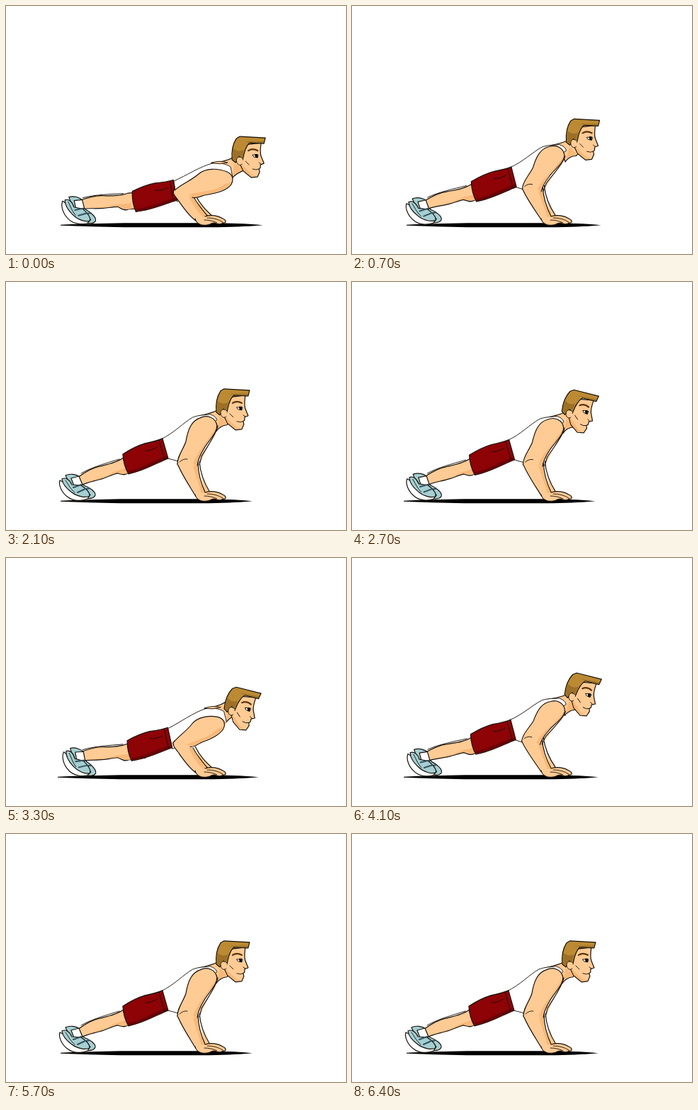
These frames come from a looping animation (480 by 350 pixels, 6500 ms). An HTML page without scripts:

```html
<!DOCTYPE html>
<html lang="en">
<head>
<meta charset="utf-8">
<title>Push-ups</title>
<style>
/* t: tick of 100 ms, j: pose 0-17 of one push-up, d: drop from the top,
   e: drop from the drawn high pose, f: drop from the drawn bent pose,
   r: 1 while pushing up, low: arms bent */
@property --t { syntax: "<integer>"; inherits: true; initial-value: 0; }
@property --j { syntax: "<number>"; inherits: true; initial-value: 0; }
@property --d { syntax: "<number>"; inherits: true; initial-value: 40; }
@property --e { syntax: "<number>"; inherits: true; initial-value: 33; }
@property --f { syntax: "<number>"; inherits: true; initial-value: 0; }
@property --r { syntax: "<number>"; inherits: true; initial-value: 0; }
@property --low { syntax: "<number>"; inherits: true; initial-value: 1; }

@keyframes tick { from { --t: 0; } to { --t: 65; } }

html, body { margin: 0; width: 100%; height: 100%; overflow: hidden; background: #fff; }
svg {
  display: block; width: 480px; height: 350px;
  animation: tick 6500ms steps(65) -4ms infinite;
  --j: round(down, mod(var(--t) * 2.5, 18), 1);
  --d: max(min(66 - .72 * pow(var(--j) - 6, 2), 140 - 10 * var(--j)), 1.7 * pow(max(0, var(--j) - 14), 2));
  --e: calc(var(--d) - 7);
  --f: calc(var(--e) - 33);
  --r: max(0, min((var(--j) - 4) / 4, (16 - var(--j)) / 3, 1));
  --low: clamp(0, (var(--e) - 26) * 9, 1);
}

path { stroke: #17100a; stroke-width: 1.2; stroke-linejoin: round; stroke-linecap: round; fill: none; }
.skin { fill: #ffcb94; }
.shade { fill: #f8b878; stroke: none; }
.white { fill: #fff; }
.hair { fill: #bb8a33; }
.dark { fill: #9c7027; stroke: none; }
.red { fill: #8d0306; }
.deep { fill: #6a0004; stroke: none; }
.teal { fill: #a5cfd2; }
.strap { stroke: #35525f; stroke-width: 2; }
.thin { stroke-width: .9; }
.black { fill: #000; stroke: none; }

.shadow {
  transform: translate(calc(77px - 4px * var(--r)), 309.3px)
    scaleX(calc((271 + .45 * var(--e) - 2 * var(--r)) / 271));
}
.shoes {
  transform-origin: 110px 305px;
  transform: rotate(calc((.25 * var(--e) + 3 * var(--r)) * 1deg));
}
.leg {
  transform-origin: 104px 280px;
  transform: rotate(calc((.43 - .05 * var(--r)) * var(--e) * 1deg));
}
.shorts {
  transform-origin: 168px 256px;
  transform: translate(calc((.36 - .2 * var(--r)) * var(--e) * 1px), calc((.57 - .12 * var(--r)) * var(--e) * 1px))
    rotate(calc((.18 - .07 * var(--r)) * var(--e) * 1deg));
}
.head {
  transform-origin: 320px 180px;
  transform: translate(calc(((.67 - .28 * var(--r)) * var(--e) - 1.5 * var(--r)) * 1px), calc(var(--e) * 1px))
    rotate(calc(11deg * var(--r)));
}
.high { opacity: calc(1 - var(--low)); }
.bent { opacity: var(--low); }
.high.torso {
  transform-origin: 227px 235px;
  transform: translate(calc((.39 - .23 * var(--r)) * var(--e) * 1px), calc((.77 - .2 * var(--r)) * var(--e) * 1px))
    rotate(calc(.25deg * var(--e)));
}
.bent.torso {
  transform-origin: 240px 260px;
  transform: translate(calc((.39 * var(--f) - .23 * var(--r) * var(--e)) * 1px), calc((.77 * var(--f) - .2 * var(--r) * var(--e)) * 1px))
    rotate(calc((.3 * var(--f) - 3 * var(--r)) * 1deg));
}
.fore { transform-origin: 274px 302px; }
.high .fore { transform: rotate(calc(-.25deg * var(--e))); }
.bent .fore { transform: rotate(calc(-.1deg * var(--f))); }
.high .upper {
  transform-origin: 250px 256px;
  transform: translate(calc(-.2px * var(--e)), calc(.1px * var(--e)))
    rotate(calc(.8deg * var(--e))) scale(calc(1 - .005 * var(--e)));
}
.bent .upper {
  transform-origin: 246px 262px;
  transform: translateX(calc(-.1px * var(--f) - 3px * var(--r)))
    rotate(calc((.7 * var(--f) - 11 * var(--r)) * 1deg)) scale(calc(1 - .06 * var(--r)));
}
</style>
</head>
<body>
<svg viewBox="0 0 480 350">
  <path class="shadow black" d="M0,-.6 Q40,-2.4 85,-3 H210 Q250,-2.4 271,0 Q250,2.2 210,3 H85 Q40,2 0,.4Z"/>

  <g class="high torso">
    <path class="skin" d="M270,190 C282,187 292,185 299,181 L306,176 L318,195 L312,202 C306,202 300,206 297,211 L290,192Z"/>
    <path class="shade" d="M302,190 L314,200 C306,201 301,204 298,208Z"/>
    <path class="white thin" d="M219,222 C238,213 250,199 264,191 C272,188 280,188 288,187 Q296,189 298,195 L285,205 L262,240 L243,253 L228,249Z"/>
  </g>
  <g class="bent torso">
    <path class="skin" d="M290,221 C302,220 312,219 320,214 L330,214 L338,231 C330,234 324,237 320,242 L312,226Z"/>
    <path class="shade" d="M322,222 L336,231 C328,234 323,237 320,241Z"/>
    <path class="white thin" d="M237,247 C255,239 275,226 291,222 C300,221 310,222 317,227 L320,242 L300,262 L262,268 L242,276Z"/>
    <path class="shade" d="M319,240 C319,256 300,264 284,267 L295,250Z"/>
    <path class="skin thin" d="M290,221.500 Q301,217 313,221 Q301,224 290,221.500"/>
  </g>

  <g class="shoes">
    <path class="teal" d="M84,273 C90,270 99,271 104,275 L110,287 C118,290 127,296 126,301 C124,306 116,306 110,305 L90,285Z"/>
    <path class="strap" d="M111,293 L118,291"/>
  </g>
  <g class="leg">
    <path class="skin" d="M101,276 C112,268 122,262 133,260 C145,257 156,255 166,248 L190,240 L195,262 L172,270 C167,274 162,271 157,270 C150,272 144,275 138,277 C126,281 116,282 108,286Z"/>
    <path class="shade" d="M109,284 C125,278 140,276 149,270 C158,265 168,264 174,260 L177,268 C168,272 164,270 157,269 C150,271 146,273 138,276 C126,280 116,281 109,284Z"/>
    <path class="thin" d="M106,270 C122,261 141,256 160,250"/>
  </g>
  <g class="shoes">
    <path class="white" d="M92,277 L103,274 L108,286 L97,290Z"/>
    <path class="white" d="M76,280 C74,287 79,298 88,304 C96,310 108,309 115,306 L119,300Z"/>
    <path class="teal" d="M79,278 C84,275 90,279 93,286 L106,287 C112,291 119,297 118,302 C112,305 101,303 93,297 C86,292 80,286 79,278Z"/>
    <path class="strap" d="M95,290 L106,286 M101,297 L112,292"/>
    <path class="thin" d="M84,280 C88,285 90,291 97,297"/>
  </g>

  <g class="shorts">
    <path class="red" d="M165,243 C176,236 186,231 196,228 C206,226 214,224 221,221 L229,249 C212,256 194,267 173,271 Q166,259 165,243Z"/>
    <path class="deep" d="M174,270 L173,267 C192,263 208,252 226,246 L228,249 C212,256 194,266 174,270Z"/>
    <path class="thin" d="M216,223 L224,250 M214,233 Q204,239 197,238"/>
  </g>

  <g class="head">
    <path class="skin" d="M313,163 L338,160 C337,168 336,174 338,179 L342,189 L337,191 L337,195 L335,197 L336,201 L333,208 L324,209 L313,200 L307,188Z"/>
    <path class="shade" d="M309,189 L314,194 L325,205 L332,207 L324,208 L313,199Z"/>
    <path class="hair" d="M297,184 C296,172 297,163 303,154 L308,151 L344,153 L342,161 L322,160 C317,164 316,169 314,175 L312,184 L307,179 L302,188Z"/>
    <path class="dark" d="M298,183 C297,177 297,172 299,168 C304,173 309,172 314,170 L311,181 L307,178 L302,186Z"/>
    <path class="dark" d="M313,158 L342,158 L341,160 L322,159Z"/>
    <path class="skin thin" d="M312,182 C304,176 301,185 305,190 Q308,193 311,190"/>
    <path d="M320,171 Q326,167 333,171" style="stroke:#593608;stroke-width:2.2"/>
    <path class="white thin" d="M326,177 L334,177 L333,181 L328,180Z"/>
    <path class="black" d="M329,176 h4 v5 h-3Z"/>
    <path class="thin" d="M326,197 Q331,199 335,197 M316,186 L321,191 M335,188 L338,190"/>
  </g>

  <g class="high">
    <g class="fore">
      <path class="skin" d="M273,253 C274,270 280,284 288,297 L280,299"/>
      <path class="skin" d="M242,256 C246,268 256,283 267,301 L282,299 C276,286 271,270 271,255"/>
      <path class="shade" d="M264,259 L270,258 C270,272 276,286 280,298 L276,299 C273,285 267,272 264,259Z"/>
    </g>
    <g class="upper">
      <path class="skin" d="M299,203 C298,214 284,232 276,246 L273,258"/>
      <path class="skin" d="M242,258 C241,247 250,237 254,225 C257,208 262,196 274,192 C284,187 296,191 298,203 C297,215 284,226 279,236 C274,244 271,251 270,259"/>
      <path class="shade" d="M297,205 C296,215 283,226 278,236 C273,244 270,251 269,258 L264,258 C267,242 283,229 289,216Z"/>
      <path class="thin" d="M245,254 Q250,249 256,250"/>
    </g>
  </g>
  <g class="bent">
    <g class="fore">
      <path class="skin" d="M267,266 C274,280 282,288 292,297 L280,299"/>
      <path class="skin" d="M238,258 C233,264 239,268 243,274 C250,284 258,296 268,303 L286,298 C278,289 270,279 264,268"/>
      <path class="shade" d="M258,268 L264,269 C269,279 277,289 284,298 L279,300 C271,290 263,280 258,268Z"/>
    </g>
    <g class="upper">
      <path class="skin" d="M238,260 C250,250 262,246 272,237 C282,228 300,229 312,234 C321,238 322,246 317,253 C308,263 290,265 280,267 C274,269 268,272 263,270"/>
      <path class="shade" d="M318,250 C308,262 290,264 280,266 C274,268 268,271 263,269 L258,266 C272,262 296,262 309,251Z"/>
    </g>
  </g>

  <path class="skin" d="M267,300 C268,306 275,311 284,309 C290,309 288,306 294,306 C300,309 305,308 306,306 C312,307 311,302 306,300 C300,296 290,294 281,297"/>
  <path class="thin" d="M280,302 Q290,302 298,306 M284,299 Q297,299 306,305"/>
</svg>
</body>
</html>
```
